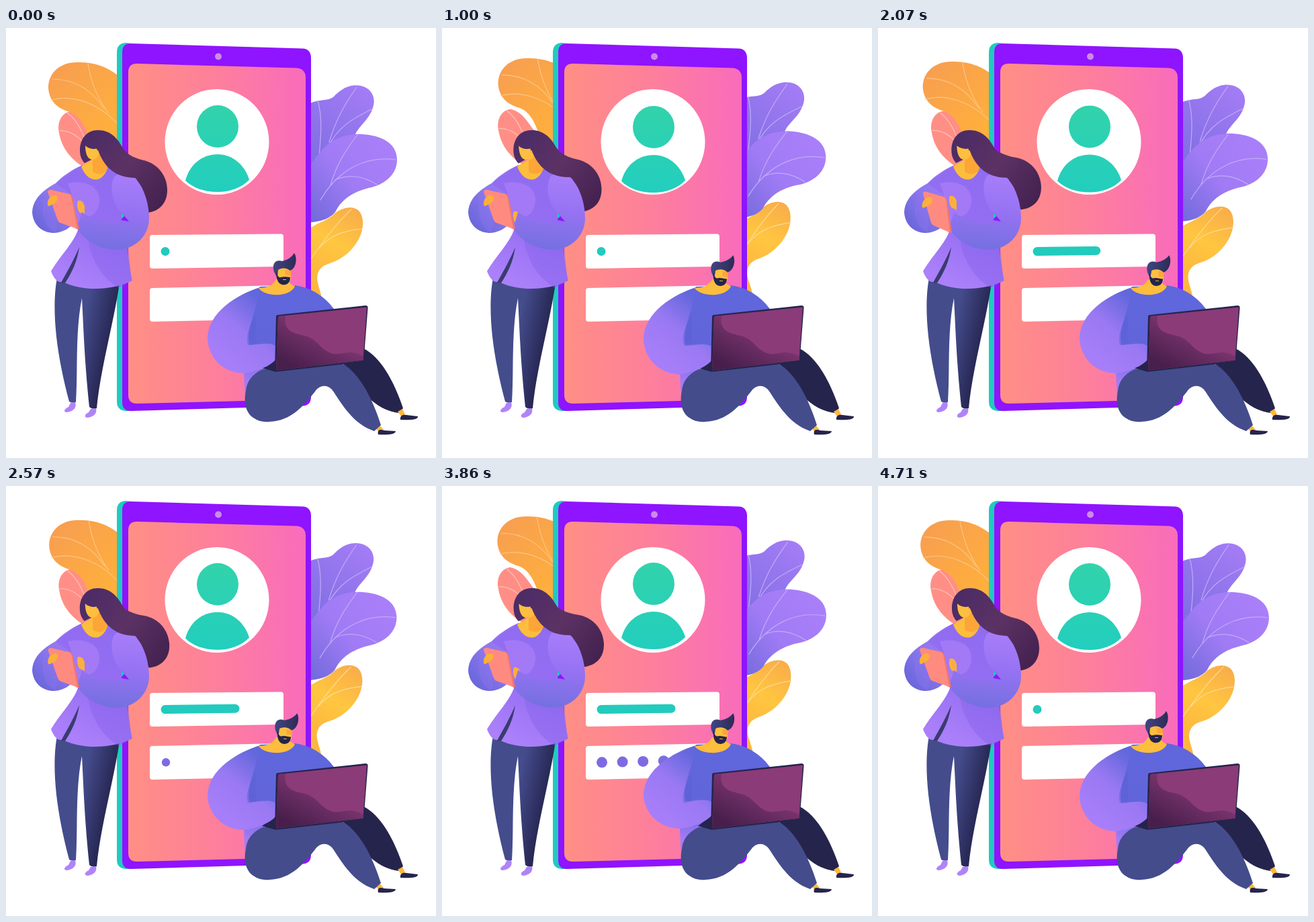
An HTML page for the animation above (4.78 s loop, 640 px wide and 640 px high).

```html
<!DOCTYPE html>
<html lang="en">
<head>
<meta charset="utf-8">
<title>Sign in</title>
<style>
html, body { margin: 0; width: 100%; height: 100%; overflow: hidden; background: #fff; }
svg { display: block; width: 100vw; height: 100vh; }
.vein { fill: none; stroke-width: 1.2; stroke-linecap: round; }
</style>
</head>
<body>
<svg viewBox="0 0 640 640" xmlns="http://www.w3.org/2000/svg">
  <defs id="defs"></defs>

  <!-- leaves -->
  <g id="pinkLeaf">
    <path fill="#ff8f86" d="M96 124C81 127 76 142 79 156C83 180 98 196 114 206L150 190L132 156C122 142 112 126 96 124Z"/>
    <path class="vein" stroke="#ffc0b4" d="M80 153C95 152 110 162 124 180M92 127C104 136 112 150 118 168"/>
  </g>
  <g id="orangeLeaf">
    <path fill="url(#orange)" d="M172 75C150 56 130 51 106 51C80 51 63 67 63 89C64 109 77 120 95 125C108 130 116 142 124 164L172 190H230V95Z"/>
    <path class="vein" stroke="#fcc583" d="M67 107C100 98 142 112 174 152M122 53C127 82 138 108 152 126M69 76C92 76 122 84 146 120"/>
  </g>
  <g id="yellowLeaf">
    <path fill="url(#yellow)" d="M425 330C445 290 474 292 488 277C500 266 518 264 526 273C534 283 532 302 524 316C513 335 497 346 480 351C466 355 461 366 464 379C466 389 470 395 470 408L425 400Z"/>
    <path class="vein" stroke="#fddb92" d="M514 270C492 290 470 320 452 346M529 299C503 302 482 308 466 328"/>
  </g>
  <g id="purpleLeaves">
    <path fill="url(#leafTop)" d="M430 125C465 100 476 112 488 102C500 89 514 83 528 86C543 89 550 102 547 115C542 136 528 142 520 158L470 240H430Z"/>
    <path class="vein" stroke="#c3aaf9" d="M522 88C508 108 492 132 481 170M544 121C518 134 494 146 479 178M464 108C471 132 469 160 466 190"/>
    <path fill="url(#leafLow)" d="M430 232C465 195 470 162 520 158C548 157 582 166 582 196C582 220 561 234 540 238C520 243 500 253 490 274C478 288 462 289 430 291Z"/>
    <path class="vein" stroke="#c3aaf9" d="M580 196C538 190 496 208 468 256M523 159C507 180 492 202 483 234M552 233C530 219 508 218 490 226"/>
  </g>

  <!-- phone -->
  <path fill="#1fcbc0" d="M178 22L186 23V570H178Q165 569 165 556V36Q165 23 178 22Z"/>
  <path fill="#8f14ff" d="M186 23L441 30.5Q454 31 454 45V549Q454 562 441 562.5L186 570Q173 570 173 557V36Q173 23 186 23Z"/>
  <path fill="url(#screen)" d="M195 53L431 59.500Q446 60 446 74V540Q446 552 434 553L195 559Q182 559 182 546V66Q182 53 195 53Z"/>
  <circle cx="316" cy="42.500" r="5" fill="#cb8be9"/>
  <ellipse cx="314" cy="169.500" rx="77.500" ry="78.500" fill="#fff"/>
  <g id="avatar" fill="url(#teal)">
    <ellipse cx="315" cy="146.500" rx="31" ry="31.500"/>
    <path d="M267 227C273 204 291 188 315 188C338 188 356 205 362 226C350 238 333 244 315 244C295 244 278 238 267 227Z"/>
  </g>
  <g fill="#fff">
    <path d="M218 308L409 306.500Q413 306.500 413 310.500V351Q413 355 409 355L218 358Q214 358 214 354V312Q214 308 218 308Z"/>
    <path d="M218 387L413 383V433L218 437Q214 437 214 433V391Q214 387 218 387Z"/>
  </g>
  <path id="entry" fill="none" stroke="#22cbbd" stroke-width="13" stroke-linecap="round"/>
  <g id="dots" fill="#7f6be1"></g>

  <!-- woman -->
  <g class="sway"><path id="tail" fill="url(#hair)" d="M158 170C174 184 187 193 205 197C226 202 240 220 240 241C240 262 227 274 208 275L182 262L160 215Z"/></g>
  <path fill="url(#legR)" d="M108 376L169 380C160 440 140 510 135 566Q128 568 124 564C117 500 115 440 113 402Z"/>
  <path fill="#444c8c" d="M76 372C69 410 71 470 94 556Q98 559 104 557C107 510 103 450 113 402L125 378Z"/>
  <path fill="#b083fa" d="M96 558L103 557C106 566 99 571 90 572C84 571 88 566 93 564ZM126 567L134 566C136 574 130 579 121 580C115 579 118 574 123 572Z"/>
  <path fill="url(#armL)" d="M114 204C95 212 83 222 74 231C52 243 39 257 39 275C41 295 55 305 72 305C86 304 94 298 104 288L125 240Z"/>
  <path fill="#8a73ea" opacity=".45" d="M58 246C72 258 80 280 74 304C60 300 49 280 58 246Z"/>
  <path fill="url(#torso)" d="M114 204C98 212 86 222 74 232L98 248L108 298C101 320 82 337 67 362C71 372 76 379 83 378L87 379C115 392 158 391 188 376C184 360 182 344 181 325L195 226C182 212 168 204 150 200Z"/>
  <path fill="#3a3b70" d="M109 326C101 346 90 364 82 379L88 379.500C98 364 106 348 109 326Z"/>
  <path fill="#835fe9" opacity=".42" d="M124 282C116 310 126 362 168 387L187 376L181 320Z"/>
  <path fill="#bd8dfb" opacity=".38" d="M92 231C118 225 142 236 139 260C136 277 126 283 116 280L106 290L98 248Z"/>
  <path id="hand" fill="#fbb03b" d="M117 278L117 265Q114 255 107 257Q104 265 109 274Z"/>
  <path fill="url(#sleeve)" d="M162 220C175 214 189 218 196 228C207 242 213 264 213 284C212 312 190 330 164 330C140 329 119 318 106 299L113 274C132 288 157 292 183 289L172 276C157 260 153 235 162 220Z"/>
  <path fill="#8f14ff" d="M172 275L183 288L172 286Z"/><path fill="#1fcbc0" d="M172 275L176 280L172 284Z"/>
  <path fill="#fdbd3d" d="M112 206C119 201 126 200 129 194L133 181H139L148 196L151 209C142 234 120 229 112 206Z"/>
  <path fill="#fda638" d="M129 196C138 196 136 186 142 188L151 209C147 219 136 219 129 214Z"/>
  <g class="sway">
    <path fill="url(#hair)" d="M137 152C120 152 110 165 110 182C110 191 113 197 117 201L127 196L132 182L137 182C145 204 160 222 190 223C205 224 215 212 208 198C192 195 181 189 174 179C166 163 154 152 137 152Z"/>
    <path fill="#fdbf3f" d="M118 175C118 186 121 196 129 196C134 194 134 188 135 184Q137 178 132 180C126 180 121 178 118 175Z"/>
  </g>
  <g id="tablet">
    <path fill="#ee776f" d="M66 241L96 247L99 252L109 299L104 299Z"/>
    <path fill="#ff8b80" d="M62 244Q63 240 68 241L93 247Q96 248 97 251L106 299L81 290Q78 289 77 286Z"/>
    <path fill="#fbb03b" d="M62 263C61 255 67 248 74 249C79 252 76 260 70 262C66 264 63 267 62 263Z"/>
  </g>

  <!-- man -->
  <path fill="#25244c" d="M500 495L532 477C559 490 579 530 591 566L584 573C555 569 528 546 505 505Z"/>
  <path fill="#fdb83c" d="M583 571L590 567L594 575L589 579ZM550 596L556 591L562 598L556 602Z"/>
  <path fill="#25244c" d="M587 583C586 576 592 575 596 576L613 578C614 583 600 584 587 583ZM554 605C552 597 558 597 563 599L580 600C580 605 566 606 554 605Z"/>
  <path fill="url(#shirt)" d="M378 385C358 415 350 470 356 548L405 540L488 418C472 397 452 386 430 383Z"/>
  <path fill="#444c8c" d="M357 540C353 560 358 573 368 580C375 585 383 587 392 586C425 585 444 561 460 541C468 530 480 530 488 542C507 572 522 591 548 600L558 591C547 555 527 514 500 499L382 508C366 515 358 527 357 540Z"/>
  <path fill="#25244c" d="M381 506L402 490V512Z"/>
  <path id="arm" fill="url(#armM)" d="M378 386C346 396 300 422 300 463C302 495 328 514 354 514C374 511 392 504 401 494L402 474C394 466 376 472 362 472C357 446 374 420 378 386Z"/>
  <path fill="#5a5fd4" opacity=".45" d="M372 428C361 445 356 460 360 472L373 469C371 455 371 442 372 428Z"/>
  <path fill="#fdbd3d" d="M376 387C387 387 397 384 402 374L421 377Q423 382 430 384C427 393 413 398 399 397C387 396 379 392 376 387Z"/>
  <g id="head">
    <path fill="#fdbf3f" d="M401 356H423L424 374Q414 386 404 378Z"/>
    <path fill="#fda638" d="M415 360H424V368H416Z"/>
    <path fill="url(#hairM)" d="M399 363C395 350 402 344 411 347C420 345 426 340 429 335C434 342 432 358 423 361C416 356 410 357 405 360L404 372Z"/>
    <path fill="#25244c" d="M402 361C403 367 405 372 409 371C414 369.500 418 371 423 371C423 381 416 383 411 382C404 380 402 372 402 361Z"/>
    <path d="M412 374.500H417" fill="none" stroke="#fdb63c"/>
  </g>
  <path fill="#25244c" d="M405 427L535 413Q539 413 538.500 417L532.500 494Q532 497 528 497.500L404 511.500Q400 512 400 508L402 430Q402 427 405 427Z"/>
  <path fill="#8a3b78" d="M405 429L537 415.500L531.500 494.500L402 509.500Z"/>
  <path fill="url(#glare)" d="M405 429L416 428C413 446 421 453 440 457C464 461 466 478 484 484C500 489 510 476 532 489L531.500 494.500L402 509.500Z"/>
</svg>
<script>
const LOOP = 4780, STEPS = 67;
const $ = id => document.getElementById(id);

// id, x1, y1, x2, y2, colours
const gradients = [
  ['orange', 80, 60, 165, 150, '#f89f50', '#ffb03b'],
  ['yellow', 520, 270, 460, 370, '#f9ad4a', '#ffc640', '#fdb63f'],
  ['leafTop', 540, 95, 455, 200, '#a37cf5', '#7f6ee3'],
  ['leafLow', 570, 180, 455, 280, '#a97ff9', '#a07bf5', '#746bdc'],
  ['screen', 182, 0, 446, 0, '#ff8f84', '#fd7f9c', '#f96cbc'],
  ['teal', 315, 115, 315, 244, '#32d3ab', '#22cebe'],
  ['hair', 112, 160, 238, 260, '#4a2b66', '#5c3264', '#43214f'],
  ['legR', 112, 450, 160, 460, '#444c8c', '#24234d'],
  ['armL', 115, 220, 40, 290, '#a17af7', '#8f78ef', '#6866da'],
  ['torso', 90, 370, 170, 210, '#ab80fa', '#946df2', '#8f6cf0'],
  ['sleeve', 175, 220, 165, 330, '#a77dfa', '#9572f2', '#7470e0'],
  ['shirt', 360, 530, 400, 410, '#a47df8', '#6265da', '#6066db'],
  ['armM', 318, 490, 385, 410, '#a77ef9', '#9a79f3', '#6267dc'],
  ['hairM', 400, 350, 432, 350, '#41447e', '#2c2b58'],
  ['glare', 430, 505, 470, 430, '#481f4c', '#8a3b78']
];
$('defs').innerHTML = gradients.map(([id, x1, y1, x2, y2, ...colours]) =>
  `<linearGradient id="${id}" gradientUnits="userSpaceOnUse" x1="${x1}" y1="${y1}" x2="${x2}" y2="${y2}">` +
  colours.map((c, i) => `<stop offset="${i / (colours.length - 1)}" stop-color="${c}"/>`).join('') +
  '</linearGradient>').join('');

$('dots').innerHTML = [0, 1, 2, 3].map(i =>
  `<circle cx="${238 + i * 30.6}" cy="${411.3 - i * 0.7}" r="8"/>`).join('');
const dots = [...$('dots').children];

const ease = x => x * x * (3 - 2 * x);
const ramp = (t, a, b) => ease(Math.min(1, Math.max(0, (t - a) / (b - a))));

// eased interpolation through [time, value] keys
function track(t, keys) {
  const i = keys.findIndex(k => k[0] > t);
  if (i < 0) return keys[keys.length - 1][1];
  const [a, u] = keys[i - 1], [b, v] = keys[i];
  return u + (v - u) * ramp(t, a, b);
}

const move = (el, x, y, r = 0, cx = 0, cy = 0) =>
  el.setAttribute('transform', `translate(${x} ${y}) rotate(${r} ${cx} ${cy})`);

const sway = document.querySelectorAll('.sway');
const handKeys = [[0, 0], [570, 18], [1430, 14], [2070, -7], [3070, 2], [3860, 13], [4710, 0]];
const tabletKeys = [[0, 0], [900, 0], [1430, 0.2], [2070, 1], [2700, 0]];
const armKeys = [[0, 0], [1430, 2], [2070, 0], [3070, -4], [3860, -4], [4710, 0]];

function draw(t) {
  const s = (1 - Math.cos(4 * Math.PI * t / LOOP)) / 2;
  move($('orangeLeaf'), 22 * s, -6.5 * s);
  move($('pinkLeaf'), 5.5 * s, -3.5 * s);
  move($('purpleLeaves'), -11.5 * s, -6.5 * s, 1.5 * s, 460, 200);
  move($('yellowLeaf'), -11 * s, -7.5 * s, -2.5 * s, 475, 340);
  move($('avatar'), 0, Math.sin(2 * Math.PI * t / LOOP));

  for (const g of sway) move(g, -3.5 * s, 0, -1.2 * s, 137, 200);
  const lift = ramp(t, 1480, 2000) - ramp(t, 4050, 4650);
  move($('tail'), 0, -2 * lift, -3.8 * lift, 175, 190);
  move($('hand'), 0, track(t, handKeys));
  const tilt = track(t, tabletKeys);
  move($('tablet'), 3 * tilt, 4 * tilt, 4 * tilt, 85, 270);

  const nod = ramp(t, 0, 500) - ramp(t, 4050, 4700);
  move($('head'), 0, 1.5 * nod, 5 * nod, 411, 385);
  const stretch = track(t, armKeys) / 128;
  $('arm').setAttribute('transform', `translate(0 ${-386 * stretch}) scale(1 ${1 + stretch})`);

  const typed = ramp(t, 990, 2430) - ramp(t, 3950, 4660);
  $('entry').setAttribute('d', `M237 332.5L${237.01 + 104 * typed} ${332.5 - 1.2 * typed}`);
  dots.forEach((dot, i) => {
    const from = 2430 + i * 130;
    dot.setAttribute('r', 8 * (ramp(t, from, from + 200) - ramp(t, 4200, 4600)));
  });
}

const start = performance.now();
function tick() {
  const p = (performance.now() - start) % LOOP / LOOP;
  draw(Math.floor(p * STEPS) * LOOP / STEPS);
  requestAnimationFrame(tick);
}
tick();
</script>
</body>
</html>
```
